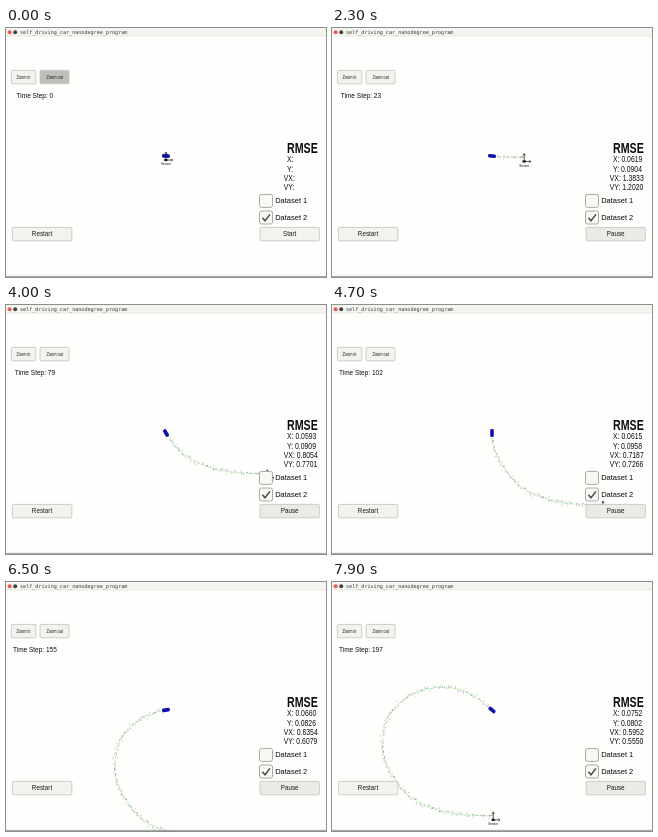
An HTML page for the animation above (8000 ms loop, 320 px wide and 249 px high).

```html
<!DOCTYPE html>
<html lang="en">
<head>
<meta charset="utf-8">
<title>Tracking simulator</title>
<style>
  html, body { margin: 0; width: 100%; height: 100%; overflow: hidden; background: #fefefc; }
  svg { display: block; width: 100vw; height: 100vh; }
  text { font: 6.3px "Liberation Sans", Arial, sans-serif; fill: #1c1c1c; }
  .mid { text-anchor: middle; }
  .title { font: 5.1px "DejaVu Sans Mono", monospace; fill: #3c3c3c; }
  .clock { font-size: 6.5px; fill: #0c0c0c; }
  .value { font-size: 9.4px; fill: #0c0c0c; }
  .heading { font-size: 14.6px; font-weight: bold; fill: #0c0c0c; }
  .option { font-size: 7.5px; fill: #0c0c0c; }
  .zoom { font-size: 6.2px; }
  .tag { font-size: 3.1px; fill: #000; }
  .button rect { fill: #f2f2ee; stroke: #c2c2be; stroke-width: .8; }
  .box { fill: #f8f8f5; stroke: #a8a8a5; stroke-width: 1; }
  .dots path { fill: none; stroke-linecap: round; }
  #zoomOut rect { animation: press 8s step-end infinite; }
  @keyframes press { 0% { fill: #bebebb; } 8.75%, 100% { fill: #f2f2ee; } }
</style>
</head>
<body>
<svg viewBox="0 0 320 249" preserveAspectRatio="none">
  <rect width="320" height="249" fill="#fefefc"/>

  <g id="world">
    <g class="dots">
      <path id="estimates" stroke="#4fdc4f" stroke-width=".9" opacity=".75"/>
      <path id="lidar" stroke="#e04848" stroke-width=".8" opacity=".65"/>
      <path id="radar" stroke="#4848e0" stroke-width=".8" opacity=".65"/>
    </g>
  </g>
  <g id="car">
    <rect x="-4" y="-1.8" width="8" height="3.6" rx="1.4" fill="#1414bc"/>
    <path d="M-1.2-1v2M1.2-1v2" stroke="#08085c" stroke-width=".8"/>
  </g>
  <g id="sensor">
    <path d="M0 0V-7M-1.2-6 0-8 1.2-6M0 0H6M5.2-1.2 6.8 0 5.2 1.2" fill="none" stroke="#111" stroke-width=".7"/>
    <rect x="-1.7" y="-1.1" width="3.2" height="2.2" fill="#111"/>
    <text class="tag mid" x="-.1" y="5.1">Sensor</text>
  </g>

  <rect width="320" height="8" fill="#f4f4f0"/>
  <path d="M0 8H320" stroke="#d8d8d4" stroke-width=".6"/>
  <path d="M0 248.4H320" stroke="#8a8a88" stroke-width=".8"/>
  <circle cx="3.6" cy="4.3" r="2" fill="#ee5a55"/>
  <circle cx="9.2" cy="4.3" r="2" fill="#45433e"/>
  <text class="title" x="14" y="6">self_driving_car_nanodegree_program</text>

  <g class="button"><rect x="5.4" y="42.4" width="24.4" height="13.4" rx="1"/>
    <text class="zoom mid" transform="translate(17.5 51.3) scale(.63 1)">Zoom in</text></g>
  <g class="button" id="zoomOut"><rect x="34" y="42.4" width="29" height="13.4" rx="1"/>
    <text class="zoom mid" transform="translate(48.8 51.3) scale(.63 1)">Zoom out</text></g>
  <text class="clock mid" id="clock" x="28.9" y="70.1"></text>

  <text class="heading" transform="translate(281 124.8) scale(.73 1)">RMSE</text>
  <g id="errors"></g>

  <rect class="box" x="253.5" y="166.4" width="13" height="13" rx="2"/>
  <rect class="box" x="253.5" y="183" width="13" height="13" rx="2"/>
  <path d="M256.4 189.8 259 192.8 264 186.4" fill="none" stroke="#4a4a4a" stroke-width="1.5"/>
  <text class="option" x="269.2" y="175.4">Dataset 1</text>
  <text class="option" x="269.2" y="192.1">Dataset 2</text>

  <g class="button"><rect x="6.4" y="199.4" width="59.4" height="13.4" rx="1"/>
    <text class="mid" x="36" y="208.4">Restart</text></g>
  <g class="button"><rect id="runBox" x="254" y="199.4" width="59.4" height="13.4" rx="1"/>
    <text class="mid" id="run" x="283.7" y="208.4"></text></g>
</svg>
<script>
  const $ = id => document.getElementById(id);
  const LOOP = 8000, TICK = 100, CAR = [160, 128];

  // Car position relative to the sensor, one knot every 20 steps.
  const SPACING = 20;
  const route = [[0, -4], [-28, -5], [-56, -10], [-83, -23], [-102, -46], [-111, -73],
                 [-104, -104], [-82, -125], [-52, -133], [-23, -126], [1, -108]];

  // step, then RMSE of x, y, vx, vy
  const errors = [
    [16, .0668, .0985, 1.6214, 1.3706], [23, .0619, .0904, 1.3833, 1.2020],
    [60, .0575, .0868, .8771, .8061], [102, .0615, .0958, .7187, .7266],
    [126, .0686, .0877, .6953, .6600], [155, .0660, .0826, .6354, .6079],
    [197, .0752, .0802, .5952, .5550]];

  const pace = [[2300, 23], [3400, 60], [4700, 102], [5500, 126], [6500, 155], [7900, 197]];

  // Linear lookup of one column in a table sorted by its first column.
  function lookup(table, at, column = 1) {
    let i = 1;
    while (i < table.length - 1 && table[i][0] < at) i++;
    const a = table[i - 1], b = table[i];
    return a[column] + (b[column] - a[column]) * (at - a[0]) / (b[0] - a[0]);
  }

  function stepAt(ms) {
    if (ms < 900) return 0;
    if (ms < 1600) return 16;
    if (ms < 2300) return 19;
    return Math.round(lookup(pace, ms));
  }

  // Catmull-Rom curve through the route.
  function position(step) {
    const last = route.length - 1;
    const i = Math.max(0, Math.min(last - 1, Math.floor(step / SPACING)));
    const u = step / SPACING - i;
    const knot = k => route[Math.max(0, Math.min(last, k))];
    const [a, b, c, d] = [-1, 0, 1, 2].map(k => knot(i + k));
    return [0, 1].map(n => b[n] + u / 2 * (c[n] - a[n]
      + u * (2 * a[n] - 5 * b[n] + 4 * c[n] - d[n]
      + u * (3 * (b[n] - c[n]) + d[n] - a[n]))));
  }

  function heading(step) {
    const a = position(Math.max(0, step - 1)), b = position(step + 1);
    return Math.atan2(b[1] - a[1], b[0] - a[0]) * 180 / Math.PI;
  }

  let seed = 11;
  const random = () => (seed = seed * 16807 % 2147483647) / 2147483647;
  const noise = size => (random() + random() + random() - 1.5) * size;

  const dot = (step, spread) =>
    "M" + position(step).map(v => (v + noise(spread)).toFixed(1)).join(" ") + "h.01";
  const trail = { estimates: [], lidar: [], radar: [] };
  for (let s = 1; s <= 200; s++) {
    trail.estimates.push(dot(s, .8));
    trail.lidar.push(s % 2 ? dot(s, 2.2) : "");
    trail.radar.push(s % 2 ? "" : dot(s, 2.8));
  }

  const labels = ["X:", "Y:", "VX:", "VY:"];
  const rows = labels.map((label, i) => {
    const row = document.createElementNS("http://www.w3.org/2000/svg", "text");
    row.setAttribute("class", "value");
    row.setAttribute("transform", `translate(${i < 2 ? 281 : 277.8} ${134.2 + i * 9.4}) scale(.73 1)`);
    return $("errors").appendChild(row);
  });

  let shown = -1;
  function show(step) {
    if (step === shown) return;
    shown = step;
    const [x, y] = position(step);
    const shift = `translate(${CAR[0] - x} ${CAR[1] - y})`;
    $("world").setAttribute("transform", shift);
    $("sensor").setAttribute("transform", shift);
    $("car").setAttribute("transform", `translate(${CAR}) rotate(${heading(step)})`);
    for (const name in trail) $(name).setAttribute("d", trail[name].slice(0, step).join(""));
    $("clock").textContent = "Time Step: " + step;
    $("run").textContent = step ? "Pause" : "Start";
    $("runBox").style.fill = step ? "#ebebe6" : "#f2f2ee";
    rows.forEach((row, i) => {
      row.textContent = labels[i] + (step ? " " + lookup(errors, step, i + 1).toFixed(4) : "");
    });
  }

  function frame() {
    const ms = performance.now() % LOOP;
    show(stepAt(Math.floor(ms / TICK) * TICK));
    requestAnimationFrame(frame);
  }
  frame();
</script>
</body>
</html>
```
